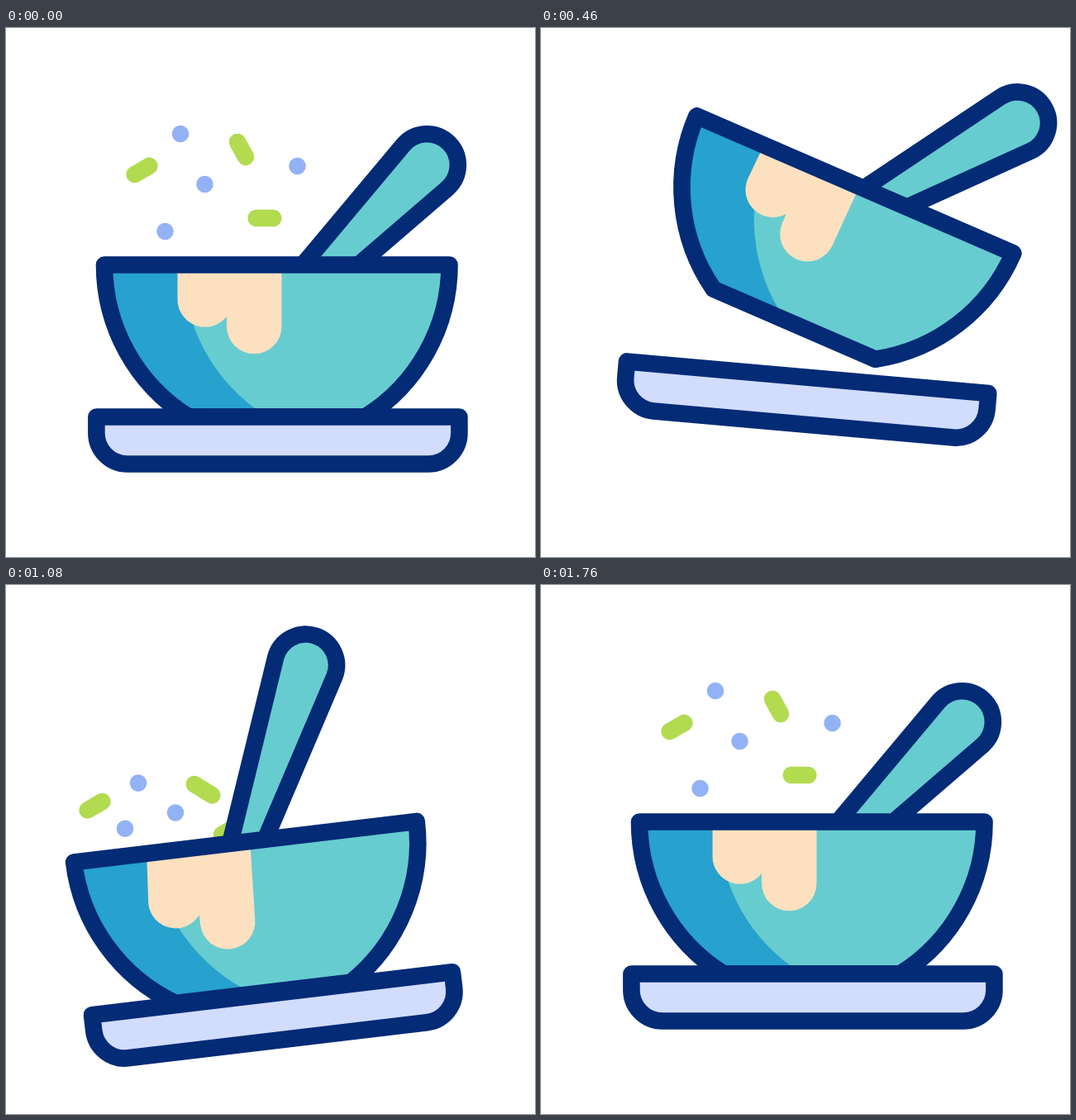
An HTML page with a canvas for the animation above (2400 ms loop, 640 by 640 pixels).

```html
<!DOCTYPE html>
<html>
<head>
<meta charset="utf-8">
<style>
html, body { margin: 0; width: 100%; height: 100%; overflow: hidden; background: #fff; }
canvas { display: block; }
</style>
</head>
<body>
<canvas id="stage" width="640" height="640"></canvas>
<script>
const ctx = document.getElementById('stage').getContext('2d');
const LOOP = 2400, STEP = 20, LINE = 20.6;
const NAVY = '#032b76', TEAL = '#67ccd0', BLUE = '#27a1ce', CREAM = '#fde0bf',
      LILAC = '#d2dcfd', GREEN = '#b2db50', DOT = '#93b2f5';

// Poses at each beat; every part ends at rest, so trailing zeros are left out
const BEATS = [10, 340, 600, 820, 1080, 1420, 1760];
const pose = {
  tilt: [0, 7.5, -0.1, -7.1, -6.8],
  plateX: [0, -9, -8.3, -7.7, -3.6],
  bowlX: [0, 36, -20.7, -48.7, -27.5],
  creamSag: [0, -1.5, -1.5, -10, -5],
  creamDrop: [0, 20, -18, 43, 19],
  spoonX: [0, -64, 11, -15, -83.8, -15.5],
  spoonY: [0, -67, 26, -49, -82.6, -14.5],
  spoonTurn: [0, -15.3, 3.2, -3.7, -19.4, -3.8]
};
// Crouch, jump, land, recover
const JUMP_TIMES = [10, 200, 340, 600, 820, 930, 1080, 1400];
const JUMP = [0, 44, 17, -108, 13, 53, 23.5, 0];

const FLY_TIMES = [980, 1080, 1420, 1760];
// x, y and angle at rest, then at the top of the flight
const sprinkles = [
  [DOT, 211, 128, 0, 200, 105, 0],
  [DOT, 240.5, 189, 0, 245, 174, 0],
  [DOT, 352.5, 167, 0, 348, 146, 0],
  [DOT, 192.5, 246, 0, 184, 211, 0],
  [GREEN, 164.5, 172, -30, 147.5, 158, -30],
  [GREEN, 285, 147, 61, 278.5, 120.5, 32],
  [GREEN, 313, 230, 0, 312, 213, -30]
];

const bowl = new Path2D('M119 286.5H536.5A217 217 0 0 1 434.5 470.5H221A217 217 0 0 1 119 286.5Z');
const shade = new Path2D('M119 286.5A217 217 0 0 0 221 470.5H316A217 217 0 0 1 214 286.5Z');
const plate = new Path2D('M109.4 470.5H548.4V490A37.5 37.5 0 0 1 510.9 527.5H146.9A37.5 37.5 0 0 1 109.4 490Z');
const spoon = new Path2D('M-16.9 255L-37.4 3A37.5 37.5 0 1 1 37.4 3L16.9 255');

// Smooth interpolation that does not overshoot its keys
function sample(keys, t, times = BEATS) {
  const last = times.length - 1, value = i => keys[i] ?? 0;
  if (t <= times[0]) return value(0);
  if (t >= times[last]) return value(last);
  const slope = i => (value(i + 1) - value(i)) / (times[i + 1] - times[i]);
  const tangent = i => {
    if (i === 0 || i === last) return 0;
    const p = slope(i - 1), q = slope(i);
    return p * q > 0 ? 2 * p * q / (p + q) : 0;
  };
  const i = times.findIndex(k => k > t) - 1;
  const span = times[i + 1] - times[i], u = (t - times[i]) / span, w = 1 - u;
  return value(i) * w * w * (1 + 2 * u) + value(i + 1) * u * u * (3 - 2 * u)
    + span * u * w * (tangent(i) * w - tangent(i + 1) * u);
}

// Half a sine wave from one time to another, otherwise zero
const arc = (t, from, to) => t > from && t < to ? Math.sin(Math.PI * (t - from) / (to - from)) : 0;

function pivot(x, y, deg) {
  ctx.translate(x, y);
  ctx.rotate(deg * Math.PI / 180);
}

function outline(path) {
  ctx.strokeStyle = NAVY;
  ctx.stroke(path);
}

function paint(path, fill, outlined) {
  ctx.fillStyle = fill;
  ctx.fill(path);
  if (outlined) outline(path);
}

function drawSprinkle(t, [color, x, y, deg, topX, topY, topDeg]) {
  let half = color === GREEN ? 10.3 : 0;
  if (t < 600) {
    const fall = (Math.max(t - 10, 0) / 260) ** 2;
    x += (320 - x) * 0.35 * fall;
    y += (430 - y) * fall;
  } else {
    const fly = (...keys) => sample(keys, t, FLY_TIMES);
    const lowX = topX - 40, lowY = 185 + topY * 0.52;
    half += fly(1, 1, 1, 0) * Math.abs(topDeg - deg) * 0.08;
    x = fly((lowX + 240) / 2, lowX, topX, x);
    y = fly(430, lowY, topY, y);
    deg = fly(topDeg, topDeg, topDeg, deg);
  }
  ctx.save();
  pivot(x, y, deg);
  ctx.strokeStyle = color;
  ctx.beginPath();
  ctx.moveTo(-half, 0);
  ctx.lineTo(half + 0.01, 0);
  ctx.stroke();
  ctx.restore();
}

function drawBowl(t, now, jump) {
  ctx.save();
  pivot(327.75 + now.bowlX, 378 + jump - 75 * arc(t, 325, 820),
    now.tilt + 23.3 * arc(t, 310, 828));
  ctx.translate(-327.75, -378);

  ctx.save();
  pivot(509.5 + now.spoonX, 165.5 + now.spoonY, 44.6 + now.spoonTurn);
  paint(spoon, TEAL, true);
  ctx.restore();

  const cream = new Path2D(`M207.5 288L${207.5 + now.creamSag} ${328.5 + now.creamDrop}
    a33.3 33.3 0 0 0 59.5 20.5v12a33.25 33.25 0 0 0 66.5 0L333.5 288Z`);
  paint(bowl, TEAL);
  paint(shade, BLUE);
  paint(cream, CREAM);
  outline(bowl);
  ctx.restore();
}

function drawPlate(now, jump) {
  ctx.save();
  pivot(328.9 + now.plateX, 499 + jump, now.tilt);
  ctx.translate(-328.9, -499);
  paint(plate, LILAC, true);
  ctx.restore();
}

const start = performance.now();
function frame() {
  // Moves at 50 pictures a second; the small lead absorbs timer jitter
  const t = Math.floor((performance.now() - start + 5) / STEP) * STEP % LOOP;
  const now = {};
  for (const part in pose) now[part] = sample(pose[part], t);
  const jump = sample(JUMP, t, JUMP_TIMES);

  ctx.fillStyle = '#fff';
  ctx.fillRect(0, 0, 640, 640);
  ctx.lineWidth = LINE;
  ctx.lineCap = ctx.lineJoin = 'round';
  if (t < 270 || t > 980) sprinkles.forEach(s => drawSprinkle(t, s));
  drawBowl(t, now, jump);
  drawPlate(now, jump);
  requestAnimationFrame(frame);
}
frame();
</script>
</body>
</html>
```
